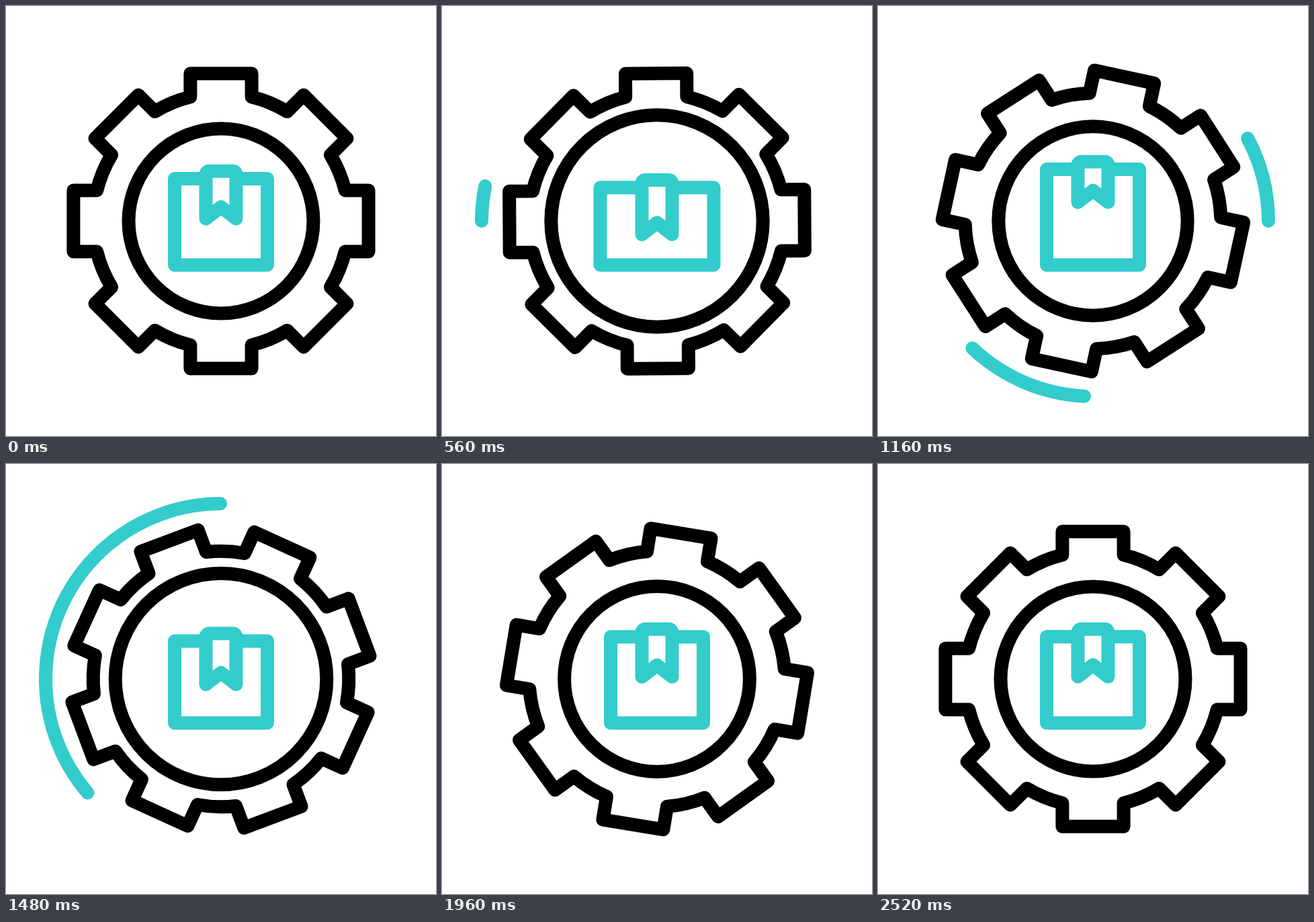
These frames come from a looping animation (640x640 px, 3000 ms). An HTML page with a canvas:

```html
<!DOCTYPE html>
<html lang="en">
<head>
<meta charset="utf-8">
<title>Gear and package</title>
<style>
  html, body { margin: 0; height: 100%; overflow: hidden; background: #fff; }
  canvas { display: block; }
</style>
</head>
<body>
<canvas id="stage" width="640" height="640"></canvas>
<script>
const ctx = document.getElementById('stage').getContext('2d');
const BLACK = '#000', TEAL = '#33cccc';
const LOOP = 3000, STEP = 40;
const RAD = Math.PI / 180;

// Keyframes as [time in ms, value], eased in and out between neighbours.
const gearAngle = [[0, 0], [480, -87.5], [1000, -132.5], [2000, 10], [2520, 0]];
const ringRadius = [[80, 137.5], [560, 157.7], [1040, 137.5], [1520, 157.7], [2000, 137.5]];
const boxHalfWidth = [[80, 69], [560, 84.5], [1040, 69]];
const boxTop = [[0, 257], [520, 270.8], [1080, 241], [1520, 264.1], [2000, 257]];
const sweeps = [
  { from: 180, head: [[480, 0], [1000, 180]], tail: [[800, 0], [1280, 180]] },
  { from: 92.85, head: [[1000, 0], [1520, 180]], tail: [[1320, 0], [1800, 180]] },
];

function valueAt(keys, t) {
  if (t <= keys[0][0]) return keys[0][1];
  for (let i = 1; i < keys.length; i++) {
    const [t0, v0] = keys[i - 1], [t1, v1] = keys[i];
    if (t < t1) {
      const x = (t - t0) / (t1 - t0);
      return v0 + (v1 - v0) * x * x * (3 - 2 * x);
    }
  }
  return keys[keys.length - 1][1];
}

function stroke(color, build) {
  ctx.strokeStyle = color;
  ctx.beginPath();
  build();
  ctx.stroke();
}

function gear(angle) {
  const halfTooth = 45.6, tip = 219.6, root = 190.3;
  const base = Math.asin(halfTooth / root);
  ctx.save();
  ctx.rotate(angle * RAD);
  stroke(BLACK, () => {
    for (let i = 0; i < 8; i++) {
      const a = i * Math.PI / 4, c = Math.cos(a), s = Math.sin(a);
      for (const y of [-halfTooth, halfTooth]) ctx.lineTo(tip * c - y * s, tip * s + y * c);
      ctx.arc(0, 0, root, a + base, a + Math.PI / 4 - base);
    }
    ctx.closePath();
  });
  ctx.restore();
}

function parcel(halfWidth, top) {
  const bottom = 65.5, half = 22.5;
  const flapTop = top - 11.3, flapEnd = -3.4 + 1.75 * (top + 63);
  stroke(TEAL, () => ctx.rect(-halfWidth, top, 2 * halfWidth, bottom - top));
  ctx.fillStyle = '#fff';
  stroke(TEAL, () => {
    ctx.moveTo(-half, flapEnd);
    ctx.arcTo(-half, flapTop, 0, flapTop, 5);
    ctx.arcTo(half, flapTop, half, flapEnd, 5);
    ctx.lineTo(half, flapEnd);
    ctx.lineTo(0, flapEnd - 17.5);
    ctx.closePath();
    ctx.fill();
  });
}

function draw(t) {
  ctx.setTransform(1, 0, 0, 1, 0, 0);
  ctx.clearRect(0, 0, 640, 640);
  ctx.translate(320, 320);
  ctx.lineWidth = 20;
  ctx.lineCap = ctx.lineJoin = 'round';

  gear(valueAt(gearAngle, t));
  stroke(BLACK, () => ctx.arc(0, 0, valueAt(ringRadius, t), 0, 2 * Math.PI));
  parcel(valueAt(boxHalfWidth, t), valueAt(boxTop, t) - 320);

  for (const { from, head, tail } of sweeps) {
    const start = valueAt(tail, t), end = valueAt(head, t);
    if (end > start) stroke(TEAL, () => ctx.arc(0, 0, 261, (from + start) * RAD, (from + end) * RAD));
  }
}

const begin = performance.now();
function tick() {
  const t = (performance.now() - begin) % LOOP;
  draw(Math.floor(t / STEP) * STEP);
  requestAnimationFrame(tick);
}
tick();
</script>
</body>
</html>
```
